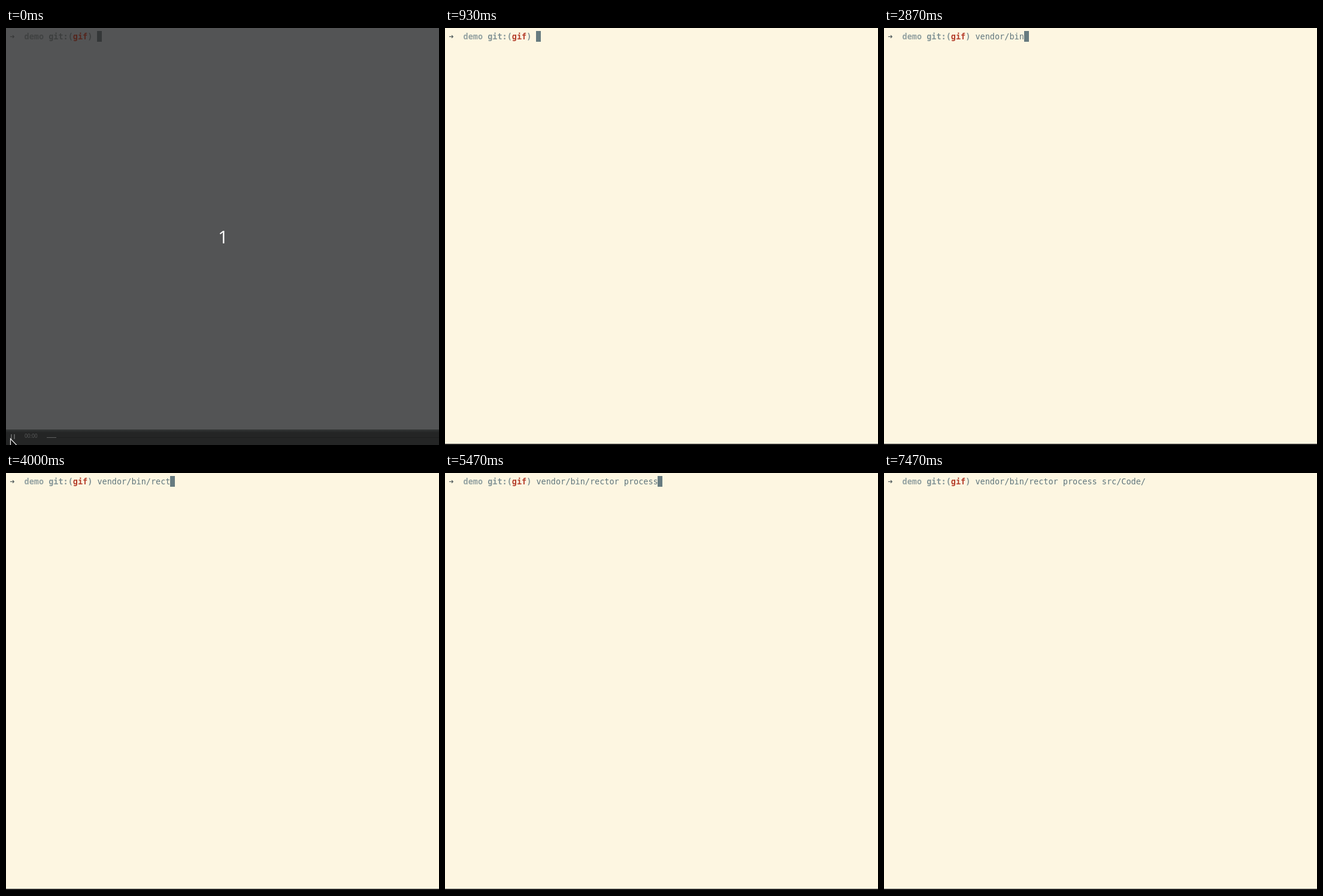
Recreate the animation shown at these times as an HTML page with a canvas. Size 723 px wide and 697 px high, loop 8000 ms.

```html
<!DOCTYPE html>
<html lang="en">
<head>
<meta charset="utf-8">
<style>
  html, body { margin: 0; width: 100%; height: 100%; overflow: hidden; background: #fdf6e1; }
  canvas { display: block; }
</style>
</head>
<body>
<canvas id="stage" width="723" height="697"></canvas>
<script>
const W = 723, H = 697, LOOP = 8000;
const LEFT = 6.2, CELL = 8.127, BASE = 19, PROMPT = 18;
const MONO = '13.5px "DejaVu Sans Mono", monospace';
const ctx = document.getElementById('stage').getContext('2d');

const LIGHT = { bg: '#fdf6e1', arrow: '#565f60', dir: '#93a1a1', git: '#839496', branch: '#b53f2c', text: '#60767d', cursor: '#677b80' };
const DIM = { bg: '#535455', arrow: '#393a3a', dir: '#404242', git: '#3c3e3e', branch: '#55261e', text: '#3c3e3e', cursor: '#343738' };

// Typing bursts: first key, last key, keystrokes spread evenly between them
const BURSTS = [
  [1930, 2130, 'v|e|n|d'],
  [2270, 2470, 'o|r|/'],
  [2730, 2870, 'b|i|n'],
  [3200, 3200, '/'],
  [3530, 4200, 're|c|t|o'],
  [4400, 4730, 'r| |p|r'],
  [4870, 5200, 'o|c|e|s'],
  [5470, 5470, 's'],
  [5670, 5930, ' |sr|c'],
  [6330, 7000, '/|C|o|de/']
];
const KEYS = BURSTS.flatMap(([from, to, keys]) =>
  keys.split('|').map((key, i, all) => ({
    key, time: from + (to - from) * i / Math.max(1, all.length - 1)
  })));

function rect(color, x, y, w, h) {
  ctx.fillStyle = color;
  ctx.fillRect(x, y, w, h);
}

function write(str, col, color, bold) {
  ctx.font = (bold ? 'bold ' : '') + MONO;
  ctx.textAlign = 'left';
  ctx.fillStyle = color;
  [...str].forEach((ch, i) => ctx.fillText(ch, LEFT + (col + i) * CELL, BASE));
}

function terminal(t, c) {
  rect(c.bg, 0, 0, W, H);
  write('➜', 0, c.arrow);
  write('demo', 3, c.dir, true);
  write('git:(', 8, c.git, true);
  write('gif', 13, c.branch, true);
  write(')', 16, c.git, true);

  const pressed = KEYS.filter(k => t >= Math.floor(k.time));
  const typed = pressed.map(k => k.key).join('');
  write(typed, PROMPT, c.text);

  // The blink restarts with every key
  const lastKey = pressed.length ? pressed[pressed.length - 1].time : -70;
  if ((t - lastKey) % 1000 < 470) {
    rect(c.cursor, Math.round(LEFT + (PROMPT + typed.length) * CELL - 0.2), 5, 8, 18);
  }
}

function pointer() {
  ctx.beginPath();
  ctx.moveTo(18.5, 698);
  ctx.lineTo(7.5, 686.5);
  ctx.lineTo(7.5, 698);
  ctx.fillStyle = '#111';
  ctx.fill();
  ctx.lineWidth = 1.2;
  ctx.strokeStyle = '#f4f4f4';
  ctx.stroke();
}

// The bar slides out in three eased steps and leaves a thin edge
function controls(t, dim) {
  const step = Math.min(3, Math.floor((t + 5) / 67));
  const top = Math.round(695 - 24 * (1 - step / 3) ** 1.7);
  if (step === 3) return rect('#242424', 0, top, W, H - top);

  const ink = dim ? '#5c5d5d' : '#d8d8d8';
  const mid = top + (dim ? 13 : 11);
  const shade = ctx.createLinearGradient(0, top, 0, top + 5);
  shade.addColorStop(0, dim ? '#343737' : '#6a6a66');
  shade.addColorStop(1, dim ? '#242525' : '#171717');
  rect(shade, 0, top, W, H - top);
  rect(dim ? '#1e1f1f' : '#343434', 68, mid, W - 68, 1);
  rect(ink, 68, mid, dim ? 16 : 19, 1);
  rect(ink, 8, mid - 5, 2, 8);
  rect(ink, 13, mid - 5, 2, 8);
  ctx.font = '8.5px "Open Sans", sans-serif';
  ctx.textAlign = 'left';
  ctx.fillStyle = ink;
  ctx.fillText(dim ? '00:00' : '00:01', 31, mid + (dim ? 1 : 3));
  pointer();
}

function countdown() {
  ctx.font = '500 30px "Open Sans", sans-serif';
  ctx.textAlign = 'center';
  ctx.fillStyle = '#fff';
  ctx.fillText('1', W / 2 + 1, 359.5);
}

function draw() {
  const t = performance.now() % LOOP;
  const dim = t < 70;
  terminal(t, dim ? DIM : LIGHT);
  controls(t, dim);
  if (dim) countdown();
  requestAnimationFrame(draw);
}
draw();
</script>
</body>
</html>
```
